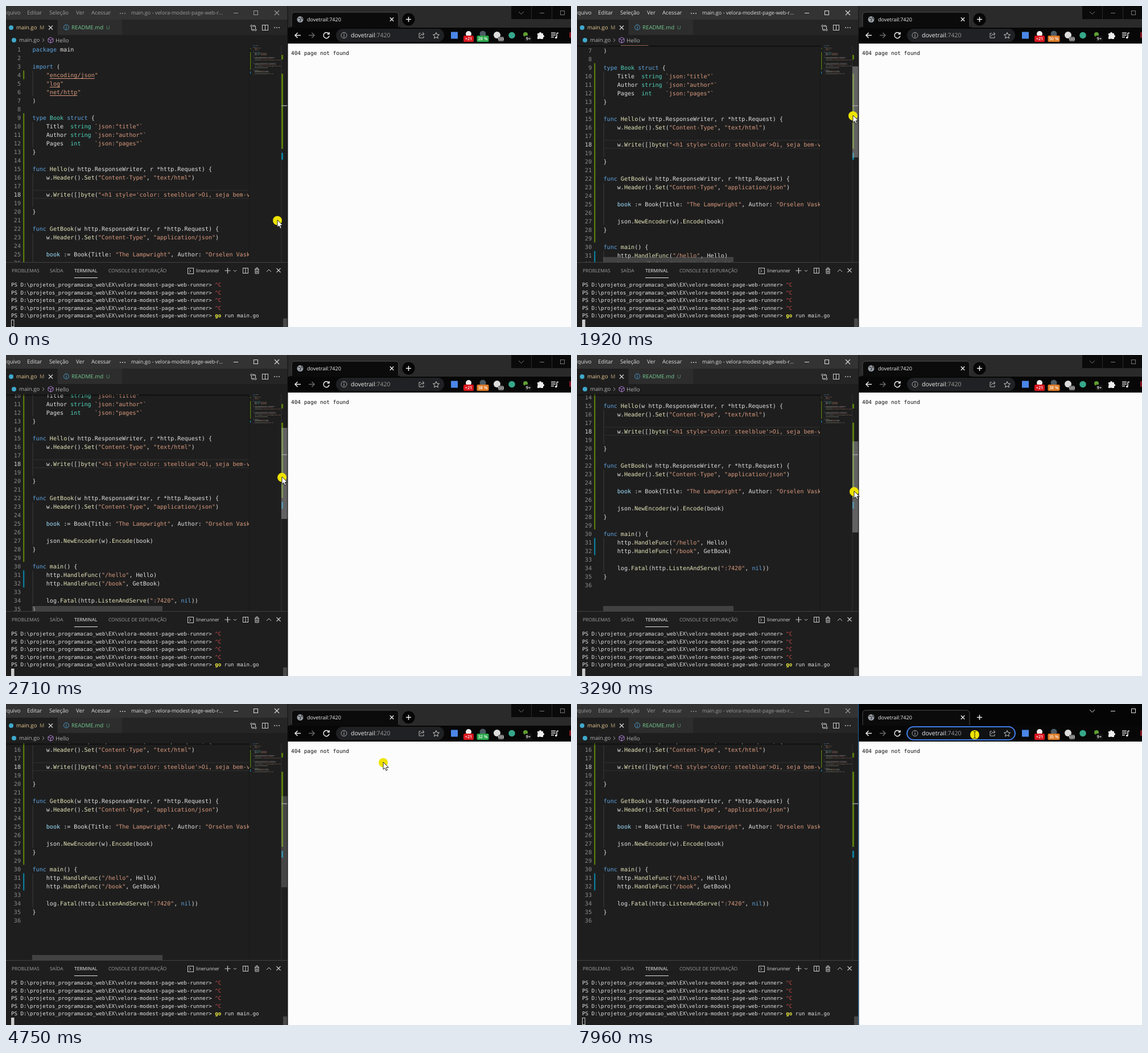
Animation of 993x564 px, one loop 8000 ms. Source, as an HTML page:

```html
<!DOCTYPE html>
<html lang="pt">
<head>
<meta charset="utf-8">
<title>Editor and browser</title>
<style>
  html, body { margin: 0; width: 100%; height: 100%; overflow: hidden; background: #1e1e1e; }
  svg { display: block; width: 993px; height: 564px; }
  text { white-space: pre; text-rendering: geometricPrecision; font-family: "Open Sans", "Noto Sans", sans-serif; }
  .mono { font-family: "DejaVu Sans Mono", monospace; }
</style>
</head>
<body>
<svg id="stage" viewBox="0 0 993 564" xmlns="http://www.w3.org/2000/svg"></svg>
<script>
const LOOP = 8000, CHAR = 6.07, LINE = 15, CODE_X = 46.5, CODE_Y = 76;
const PROJECT = 'velora-modest-page-web-runner';
const HOST = 'dovetrail', PORT = ':7420';

const code = `package main

import (
    "encoding/json"
    "log"
    "net/http"
)

type Book struct {
    Title  string \`json:"title"\`
    Author string \`json:"author"\`
    Pages  int    \`json:"pages"\`
}

func Hello(w http.ResponseWriter, r *http.Request) {
    w.Header().Set("Content-Type", "text/html")

    w.Write([]byte("<h1 style='color: steelblue'>Oi, seja bem-vindo!</h1>"))

}

func GetBook(w http.ResponseWriter, r *http.Request) {
    w.Header().Set("Content-Type", "application/json")

    book := Book{Title: "The Lampwright", Author: "Orselen Vask", Pages: 300}

    json.NewEncoder(w).Encode(book)
}

func main() {
    http.HandleFunc("/hello", Hello)
    http.HandleFunc("/book", GetBook)

    log.Fatal(http.ListenAndServe("${PORT}", nil))
}
`.split('\n');

// Small SVG builders; text y is the middle of the letters.
const esc = s => s.replace(/&/g, '&amp;').replace(/</g, '&lt;');
const rect = (x, y, w, h, fill, more = '') =>
  `<rect x="${x}" y="${y}" width="${w}" height="${h}" fill="${fill}" ${more}/>`;
const dot = (x, y, r, fill, more = '') => `<circle cx="${x}" cy="${y}" r="${r}" fill="${fill}" ${more}/>`;
const line = (d, color = '#ccc', width = 1, more = '') =>
  `<path d="${d}" fill="none" stroke="${color}" stroke-width="${width}" ${more}/>`;
const raw = (x, y, size, inner, fill, more = '') =>
  `<text x="${x}" y="${(y + size * .36).toFixed(2)}" font-size="${size}" fill="${fill}" ${more}>${inner}</text>`;
const label = (x, y, size, s, fill = '#ccc', more = '') => raw(x, y, size, esc(s), fill, more);
const group = (id, inner, more = '') => `<g id="${id}" ${more}>${inner}</g>`;
const span = (s, fill, more = '') => `<tspan fill="${fill}" ${more}>${esc(s)}</tspan>`;
const cross = (x, y, r, color, w = 1.1) =>
  line(`M${x - r} ${y - r}l${2 * r} ${2 * r}m0 ${-2 * r}l${-2 * r} ${2 * r}`, color, w);
const plus = (x, y, r, color, w = 1.2) => line(`M${x - r} ${y}h${2 * r}M${x} ${y - r}v${2 * r}`, color, w);
const box = (x, y, w, h, color = '#ccc') => rect(x, y, w, h, 'none', `stroke="${color}"`);
const ellipsis = (x, y, color = '#ccc') => [-4, 0, 4].map(d => dot(x + d, y, .9, color)).join('');

const PLAIN = '#e2e2e2';
const tokenColors = ['#d99a7f', '#5fa5e0', '#52d3ba', '#e6e6bc', '#9fe0ff'];
function tokens(src) {
  const rule = /("[^"]*"|`[^`]*`)|\b(package|import|type|struct|func|nil)\b|\b(string|int|Book(?= ))|(\w+)(?=\()|(book)(?= :=)/g;
  const out = [];
  let end = 0;
  for (const m of src.matchAll(rule)) {
    if (m.index > end) out.push([src.slice(end, m.index), PLAIN, end]);
    out.push([m[0], tokenColors[m.slice(1).findIndex(Boolean)], m.index]);
    end = m.index + m[0].length;
  }
  if (end < src.length) out.push([src.slice(end), PLAIN, end]);
  return out;
}

const rowTop = n => CODE_Y + (n - 1) * LINE - LINE / 2;
const rows = (x, w, from, to, fill) => rect(x, rowTop(from), w, (to - from + 1) * LINE, fill);

function codeLayer() {
  let s = rows(30, 2.3, 4, 4, '#587c0c') + rows(30, 2.3, 9, 29, '#587c0c') + rows(30, 2.3, 31, 32, '#0c7d9d');
  for (const [a, b] of [[4, 6], [10, 12], [16, 19], [23, 27], [31, 34]]) s += rows(46.5, 1, a, b, '#3a3a3a');
  s += rect(47, rowTop(18), 380, 1, '#303030') + rect(47, rowTop(19) - 1, 380, 1, '#303030');
  code.forEach((src, i) => {
    const y = CODE_Y + i * LINE;
    s += label(26, y, 10.083, String(i + 1), i === 17 ? '#d8d8d8' : '#8c8c8c', 'class="mono" text-anchor="end"');
    s += raw(CODE_X, y, 10.083, tokens(src).map(([t, c]) => span(t, c)).join(''), PLAIN, 'class="mono"');
    if (i > 2 && i < 6) s += rect(CODE_X + 5 * CHAR, y + 6, (src.trim().length - 2) * CHAR, 1, tokenColors[0]);
  });
  return s;
}

function minimap() {
  let s = rect(429, 74, 1.3, 1.6, '#587c0c') + rect(429, 81, 1.3, 31, '#587c0c') + rect(429, 115, 1.3, 4, '#0c7d9d');
  code.forEach((src, i) => {
    for (const [t, c, at] of tokens(src)) for (const word of t.matchAll(/\S+/g)) {
      const x = 434 + (at + word.index) * .75, w = Math.min(word[0].length * .75, 483 - x);
      if (w > 0) s += rect(x, 69 + i * 1.5, w, 1, c, 'opacity=".32"');
    }
  });
  return s;
}

function editor() {
  const menu = [[-9, 'Arquivo'], [37, 'Editar'], [76, 'Seleção'], [123, 'Ver'], [150, 'Acessar']];
  const title = color => menu.map(([x, s]) => label(x, 12, 9.6, s, color)).join('') + ellipsis(205, 13, color) +
    label(220, 12, 9.1, `main.go - ${PROJECT.slice(0, 24)}...`, color) +
    line('M400 12.5h8', color) + box(435.5, 8.5, 7, 7, color) + cross(476, 12, 4, color);
  return rect(0, 0, 495, 564, '#1e1e1e') + rect(0, 0, 495, 24, '#333334') +
    group('titleOff', title('#9a9a9a')) + group('titleOn', title('#dcdcdc')) +
    rect(0, 24, 495, 27, '#252526') + rect(0, 24, 90, 27, '#1e1e1e') + rect(91, 24, 113, 27, '#2d2d2d') +
    dot(9, 38, 4, '#3fa9cc') + label(18, 38, 9.7, 'main.go', '#e9c892') + label(59, 38, 9.3, 'M', '#b39b75') +
    cross(78.5, 38, 3.5, '#ddd') +
    dot(106, 37.5, 4.5, 'none', 'stroke="#4a9cc9"') + line('M106 36.5v4M106 34.5v1', '#4a9cc9') +
    label(115, 38, 9.7, 'README.md', '#73c991') + label(176, 38, 9, 'U', '#5b9b72') +
    dot(431.5, 35, 1.6, 'none', 'stroke="#ccc"') + dot(438.5, 42, 1.6, 'none', 'stroke="#ccc"') +
    line('M431.5 37v5h4m-2-2l2 2l-2 2M438.5 40v-5h-4m2-2l-2 2l2 2') +
    box(450.5, 33.5, 10, 9) + line('M455.5 33v10') + ellipsis(476, 38) +
    dot(14, 60, 4, '#3fa9cc') + label(23, 60, 9.6, 'main.go', '#b0b0b0') +
    line('M64 57l3 3l-3 3', '#999') +
    line('M78.5 55l4.5 2.5v5l-4.5 2.5l-4.5-2.5v-5zM74 57.5l4.5 2.5l4.5-2.5M78.5 60v5', '#b180d7') +
    label(87, 60, 9.8, 'Hello', '#b0b0b0') +
    `<clipPath id="pane"><rect x="0" y="69" width="427" height="381"/></clipPath>` +
    `<g clip-path="url(#pane)">${group('code', codeLayer())}</g>` +
    group('shade', rect(0, 69, 427, 3, '#000', 'opacity=".35"')) +
    rect(427, 69, 1, 381, '#161616') + minimap() +
    rect(483.5, 69, 1, 381, '#303030') + rect(484, 86, 3, 8, '#587c0c') + rect(484, 119, 3, 132, '#587c0c') +
    rect(484, 258, 3, 12, '#0c7d9d') +
    group('bars', rect(46, 441, 229, 9, '#797979', 'opacity=".4"') +
      rect(484, 69, 10.5, 160, '#aaa', 'id="slider"')) +
    rect(484, 174.5, 10, 1.5, '#a0a0a0');
}

function panel() {
  const tabs = [[10, 'PROBLEMAS'], [77, 'SAÍDA'], [120, 'TERMINAL'], [180, 'CONSOLE DE DEPURAÇÃO']];
  const prompt = `PS D:\\projetos_programacao_web\\EX\\${PROJECT}> `;
  let s = rect(0, 450, 495, 114, '#1e1e1e') + rect(0, 450, 495, 1, '#414141') +
    tabs.map(([x, t], i) => label(x, 465, 8.4, t, i === 2 ? '#f0f0f0' : '#9c9c9c')).join('') +
    rect(120, 477, 41, 1, '#e7e7e7') +
    box(319.5, 460.5, 10, 10) + line('M322 463l3 2.5l-3 2.5') + label(334, 465, 8.4, 'linerunner', '#d8d8d8') +
    plus(389.5, 465, 5, '#ccc') + line('M400 464l2.5 2.5l2.5-2.5') +
    box(416.5, 460.5, 9, 9) + line('M421 460v10') +
    line('M437 462.5h8M439.5 462v-2h3v2M438 463v7h6v-7M440 464.5v4M442 464.5v4') +
    line('M458 467l4-4l4 4') + cross(479, 464.5, 3.5, '#ccc');
  for (let i = 0; i < 5; i++) {
    const command = i < 4 ? span('^C', '#d84a4a') : span('go', '#f0f043', 'font-weight="bold"') + span(' run main.go', PLAIN);
    s += raw(9, 490 + i * 13.5, 9.17, span(prompt, PLAIN) + command, PLAIN, 'class="mono"');
  }
  return s + rect(487, 549, 7, 15, '#474747') +
    rect(9.5, 551.5, 4.5, 12, 'none', 'id="caret" stroke="#ccc"');
}

function browser() {
  const caption = color => line('M901 10l4.5 4.5l4.5-4.5', color) + line('M938 12.5h8', color) + box(974.5, 8.5, 7, 7, color);
  const badge = (x, w, fill, s, id = '') => rect(x - w / 2, 52, w, 11, fill, `rx="2" ${id && `id="${id}Box"`}`) +
    label(x, 57.5, 7.4, s, '#fff', `text-anchor="middle" font-weight="600" ${id && `id="${id}"`}`);
  return rect(495, 0, 498, 66, '#050505') +
    group('frameOff', rect(495, 0, 498, 38, '#2a2a2a') +
      [[888, 35], [924, 35], [960, 33]].map(([x, w]) => rect(x, 0, w, 23, '#0a0a0a')).join('') +
      caption('#777') + dot(707.5, 23.5, 11, '#050505')) +
    group('frameOn', caption('#ddd')) +
    `<path d="M496 38q6 0 6-6V17q0-6 6-6h176q6 0 6 6v15q0 6 6 6z" fill="#0b0b0b"/>` +
    line('M502 37V17q0-6 6-6h176q6 0 6 6v20', '#4a4a4a') +
    dot(517, 23.5, 5.5, '#9aa0a6') + line('M513 21l4 1l1 3l-2 2M519 19l1 3l2 1', '#333', 1.2) +
    label(529, 23.5, 9.05, HOST + PORT, '#f0f0f0') + cross(678, 23.5, 3.2, '#eee', 1.3) + plus(707.5, 23.5, 4.5, '#eee', 1.5) +
    rect(495, 38, 498, 28, '#070707') +
    line('M518 51.5h-10m4.5-4.5l-4.5 4.5l4.5 4.5', '#eee', 1.5) +
    line('M532 51.5h10m-4.5-4.5l4.5 4.5l-4.5 4.5', '#686868', 1.5) +
    line('M567 48.5a5 5 0 1 0 1 4M568 46v3.5h-3.5', '#eee', 1.5) +
    rect(580, 40, 190, 23, '#202124', 'rx="11.5"') +
    rect(580, 40, 190, 23, '#101113', 'id="focus" rx="11.5" stroke="#3f7be0" stroke-width="2"') +
    dot(594, 51.5, 5, 'none', 'stroke="#aaa"') + line('M594 50.5v4M594 48v1.3', '#aaa', 1.2) +
    raw(606, 51.5, 10.5, span(HOST, '#f0f0f0') + span(PORT, '#999'), '#eee') +
    line('M729 48h-3v8h8v-3M728 53q1-4 6-4m-2-3l3 3l-3 3', '#bbb') +
    line('M756 46.5l1.5 3.5l4 .4l-3 2.6l.9 3.8l-3.4-2l-3.4 2l.9-3.8l-3-2.6l4-.4z', '#ccc') +
    rect(782, 45.5, 12, 12, '#4b86e8') +
    dot(813, 49, 5, '#eee') + badge(813, 18, '#d8141c', '+21') +
    dot(838, 49, 5.5, '#4c5a63') + badge(838, 21, '#2ba84a', '28 %', 'percent') +
    dot(863, 51, 6, '#ddd') + rect(865, 54, 10, 8, '#777', 'rx="2"') + ellipsis(870, 58, '#ddd') +
    dot(889, 51.5, 5.8, '#36a88a') + dot(913, 50, 4, '#5f9e32') + badge(918, 13, '#111', '9+') +
    `<path d="M934 48h3a2 2 0 1 1 4 0h3v3a2 2 0 1 1 0 4v3h-4a2 2 0 0 0-3 0h-3v-4a2 2 0 0 0 0-3z" fill="#eee"/>` +
    line('M958 47.5h8M958 51h8M958 54.5h5M968 47.5v8M968 47.5h3', '#eee', 1.4) + dot(966.7, 55.5, 1.8, '#eee') +
    rect(990, 46, 3, 10, '#7d1720') +
    rect(495, 66, 498, 498, '#fcfcfd') +
    label(501, 83, 9.42, '404 page not found', '#111', 'class="mono"') +
    rect(494.5, 0, 1, 564, '#101010') + rect(494, 0, 1, 564, '#1d5f91', 'id="edge"');
}

const pointer = group('pointer', dot(0, 0, 8, '#eee300') +
  '<path id="arrow" d="M0-1v13l3-2.7l2 4.7l2.2-1l-2-4.5h4.1z" fill="#fff" stroke="#111" stroke-width=".9"/>' +
  group('beam', line('M-2.5-6q2.5 0 2.5 1.5q0-1.5 2.5-1.5M0-5v10M-2.5 6q2.5 0 2.5-1.5q0 1.5 2.5 1.5', '#3a3900', 1.1)));

const stage = document.getElementById('stage');
stage.innerHTML = editor() + panel() + browser() + pointer;
const el = Object.fromEntries([...stage.querySelectorAll('[id]')].map(n => [n.id, n]));

// Rows of time, then values; straight lines between rows.
const path = [[130, 477, 377], [480, 485, 262], [820, 490, 158], [1080, 490, 158], [1290, 490, 161], [1920, 485, 193],
  [2710, 485, 215], [3290, 487, 240], [3620, 487, 251], [3950, 487, 251], [4350, 590, 160], [4750, 663, 103],
  [5150, 663, 103], [5600, 699, 54]];
const scroll = [[1080, 0], [1290, 8], [1920, 88], [2710, 140], [3290, 196.5], [3620, 221]];
const barFade = [[150, 0], [300, 1], [5200, 1], [5800, 0]];
const load = [[0, 28, '#2ba84a'], [700, 72, '#d63a30'], [1700, 50, '#dd7a26'], [2400, 38, '#dd7a26'],
  [4300, 32, '#2ba84a'], [6000, 35, '#dd7a26']];

function at(table, t) {
  const i = table.findIndex(row => row[0] > t);
  if (i < 0) return table[table.length - 1].slice(1);
  if (i === 0) return table[0].slice(1);
  const a = table[i - 1], b = table[i], k = (t - a[0]) / (b[0] - a[0]);
  return a.slice(1).map((v, j) => v + (b[j + 1] - v) * k);
}
const show = (node, on) => node.setAttribute('visibility', on ? 'visible' : 'hidden');

function draw(t) {
  const editing = t >= 800 && t < 5700, browsing = t >= 5700;
  const [x, y] = at(path, t), [top] = at(scroll, t);
  const overField = x > 580 && x < 770 && y > 40 && y < 63;
  el.pointer.setAttribute('transform', `translate(${x} ${y})`);
  show(el.arrow, !overField);
  show(el.beam, overField);
  el.code.setAttribute('transform', `translate(0 ${-Math.round(top)})`);
  show(el.shade, top > 0);
  el.bars.setAttribute('opacity', at(barFade, t)[0]);
  el.slider.setAttribute('y', 69 + top * .421);
  el.slider.setAttribute('opacity', t > 820 && t < 3950 ? .48 : .28);
  show(el.titleOn, editing);
  show(el.titleOff, !editing);
  el.caret.setAttribute('fill', editing ? '#ccc' : 'none');
  show(el.frameOn, browsing);
  show(el.frameOff, !browsing);
  show(el.focus, browsing);
  show(el.edge, browsing);
  const [, value, color] = load.filter(row => row[0] <= t).pop();
  el.percent.textContent = `${value} %`;
  el.percentBox.setAttribute('fill', color);
}

const start = performance.now();
function tick() {
  draw((performance.now() - start) % LOOP);
  requestAnimationFrame(tick);
}
tick();
</script>
</body>
</html>
```
